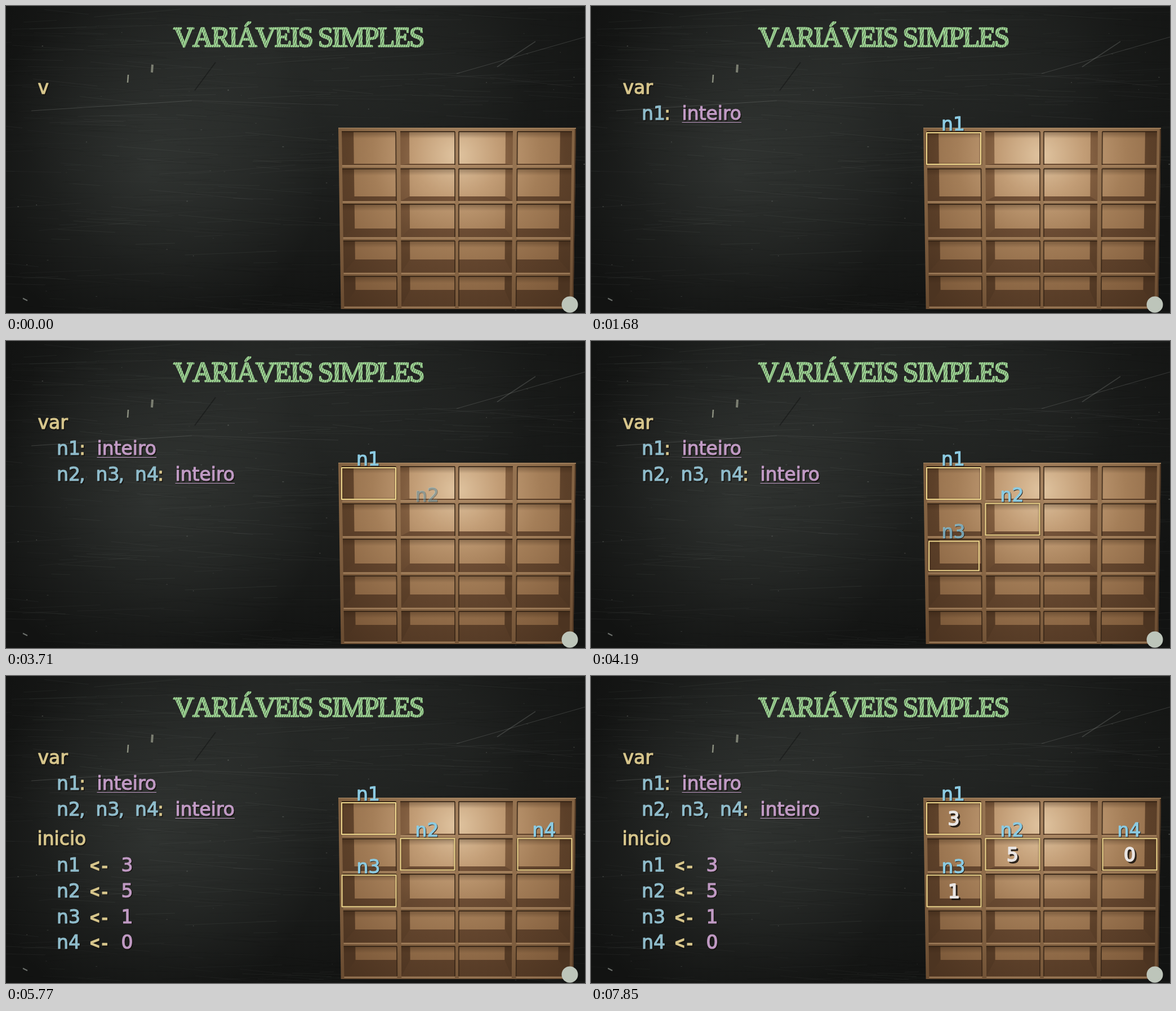
Recreate the animation shown at these times as an HTML page with a canvas. Size 1028 by 545 pixels, loop 8260 ms.

```html
<!DOCTYPE html>
<html lang="pt">
<head>
<meta charset="utf-8">
<title>Variáveis simples</title>
<style>
html, body { margin: 0; width: 100%; height: 100%; overflow: hidden; background: #111; }
canvas { display: block; width: 100vw; height: 100vh; }
</style>
</head>
<body>
<canvas id="stage" width="1028" height="545"></canvas>
<script>
const W = 1028, H = 545, LOOP = 8260, STEP = 70;
const BLUE = '#8fbccb', YELLOW = '#d7c68c', PINK = '#c09ac4', GREEN = '#a0d896';
const HAND = '33px "DejaVu Sans", sans-serif';
const MONO = 'bold 29px "Liberation Mono", monospace';

const clamp = v => Math.max(0, Math.min(1, v));
const easeOut = v => 1 - (1 - clamp(v)) ** 3;

function layer() {
  const canvas = document.createElement('canvas');
  canvas.width = W;
  canvas.height = H;
  return canvas.getContext('2d');
}

function seeded(seed) {
  return () => (seed = seed * 16807 % 2147483647) / 2147483647;
}

function line(c, x1, y1, x2, y2, color, width = 1) {
  c.strokeStyle = color;
  c.lineWidth = width;
  c.beginPath();
  c.moveTo(x1, y1);
  c.lineTo(x2, y2);
  c.stroke();
}

function polygon(c, points, fill) {
  c.fillStyle = fill;
  c.beginPath();
  points.forEach(([x, y]) => c.lineTo(x, y));
  c.fill();
}

function radial(c, x, y, r, ...colors) {
  const g = c.createRadialGradient(x, y, 0, x, y, r);
  colors.forEach((color, i) => g.addColorStop(i / (colors.length - 1), color));
  return g;
}

function drawBoard(c) {
  const random = seeded(77);
  const glow = (x, y, r, alpha) => {
    c.fillStyle = radial(c, x, y, r, `rgba(84,90,86,${alpha})`, `rgba(84,90,86,${alpha * .55})`, 'rgba(84,90,86,0)');
    c.fillRect(0, 0, W, H);
  };
  c.fillStyle = '#121312';
  c.fillRect(0, 0, W, H);
  glow(255, 285, 310, .36);
  glow(470, 80, 470, .32);
  glow(820, 130, 320, .14);

  for (let i = 0; i < 700; i++) {
    const x = random() * W - 60, y = random() * H, length = 20 + random() * 170;
    const slope = (random() - .45) * .2, tone = random() < .5 ? '0,0,0' : '185,195,188';
    line(c, x, y, x + length, y + length * slope, `rgba(${tone},${.015 + random() * .06})`);
  }
  for (let i = 0; i < 70; i++) {
    c.fillStyle = `rgba(200,205,198,${random() * .25})`;
    c.fillRect(random() * W, random() * H, 1 + random() * 2, 1 + random());
  }
  const chalk = 'rgba(190,196,190,.2)';
  line(c, 45, 186, 330, 168, chalk);
  line(c, 330, 168, 590, 176, 'rgba(190,196,190,.1)');
  line(c, 800, 120, 1028, 55, chalk);
  line(c, 872, 108, 940, 63, chalk, 1.5);
  line(c, 335, 150, 372, 100, 'rgba(0,0,0,.3)', 2);
  line(c, 217, 122, 216, 136, 'rgba(205,210,185,.6)', 2.5);
  line(c, 260, 104, 259, 118, 'rgba(205,210,185,.5)', 4);
  line(c, 30, 519, 38, 523, 'rgba(200,205,200,.5)', 2);
}

function drawShelf(c) {
  const sx = (x, y) => 800 + (x - 800) * (1 - .022 * (y - 216) / 322);
  const shape = (points, fill) => polygon(c, points.map(([x, y]) => [sx(x, y), y]), fill);
  const quad = (l, t, r, b, fill) => shape([[l, t], [r, t], [r, b], [l, b]], fill);
  const columns = [[596, 692, 21, 0], [700, 797, 16, 0], [804, 900, 0, 13], [908, 1005, 0, 21]];
  const rows = [[223, 282, 2], [289, 346, 8], [352, 410, 15], [417, 473, 23], [480, 533, 29]];

  const frame = radial(c, 800, 260, 330, '#a5825f', '#8c6a48', '#6b4d32');
  const back = radial(c, 800, 265, 300, '#e0c4a0', '#c29d76', '#a47e58', '#906b48', '#7d5a3a');
  const wall = radial(c, 800, 270, 290, '#b08c68', '#7f5c3e', '#5c4029', '#4c3421');
  const floor = radial(c, 800, 330, 290, '#76543a', '#60432c', '#4a321f');

  quad(590, 216, 1012, 538, frame);
  line(c, 590, 216.5, 1012, 217.5, '#a88a66');
  line(c, sx(1011, 218), 218, sx(1011, 538), 538, '#4c3522', 2);

  for (const [top, bottom, depth] of rows) {
    for (const [l, r, wallL, wallR] of columns) {
      const base = bottom - depth, innerL = l + wallL, innerR = r - wallR;
      quad(l, top, r, bottom, wall);
      quad(innerL, top, innerR, base, back);
      shape([[innerL, base], [innerR, base], [r, bottom], [l, bottom]], floor);
      const shade = c.createLinearGradient(0, top, 0, top + 12);
      shade.addColorStop(0, 'rgba(45,28,14,.35)');
      shade.addColorStop(1, 'rgba(45,28,14,0)');
      quad(l, top, r, top + 12, shade);
      line(c, sx(l, top), top, sx(r, top), top, 'rgba(45,30,18,.8)', 2);
      const edge = wallL ? r : l;
      line(c, sx(edge, top), top, sx(edge, bottom), bottom, 'rgba(50,33,20,.75)', 2);
      line(c, sx(l, bottom), bottom + 2, sx(r, bottom), bottom + 2, 'rgba(196,160,122,.5)', 2);
    }
  }
}

// Sketched lettering: each letter wobbles, is hatched and gets a loose outline.
function drawTitle(target) {
  const c = layer(), random = seeded(5);
  const eachLetter = draw => {
    let x = 299;
    for (const letter of 'VARIÁVEIS SIMPLES') {
      const advance = c.measureText(letter).width - 2.6;
      c.save();
      c.translate(x + advance / 2, 71.5);
      draw(letter);
      c.restore();
      x += advance;
    }
  };
  c.font = '50px "Liberation Serif", serif';
  c.textAlign = 'center';
  c.lineJoin = 'round';
  c.fillStyle = c.strokeStyle = GREEN;
  c.lineWidth = 2.4;
  eachLetter(letter => {
    c.fillText(letter, 0, 0);
    c.strokeText(letter, 0, 0);
  });
  c.globalCompositeOperation = 'destination-out';
  for (let x = 270; x < 750; x += 4) line(c, x, 80, x + 20, 24, 'rgba(0,0,0,.65)', 1.2);
  c.globalCompositeOperation = 'source-over';
  c.strokeStyle = GREEN;
  c.lineWidth = .8;
  eachLetter(letter => {
    c.rotate((random() - .5) * .09);
    c.strokeText(letter, 0, (random() - .5) * 2);
  });
  target.drawImage(c.canvas, 0, 0);
}

function drawScene() {
  const c = layer();
  drawBoard(c);
  drawShelf(c);
  drawTitle(c);
  c.fillStyle = '#bdc5ba';
  c.beginPath();
  c.arc(1001, 530, 14.5, 0, Math.PI * 2);
  c.fill();
  return c.canvas;
}

// Code tokens: text, x, baseline, colour.
const assignment = (name, value, y) =>
  [[name, 90, y, BLUE], ['<-', 149, y, YELLOW], [value, 204.5, y, PINK]];

const blocks = [
  { start: 130, rate: 1, initial: 1, tokens: [['var', 56.5, 156, YELLOW]] },
  { start: 540, rate: 1.5, tokens: [['n1', 90, 202, BLUE], [':', 130, 202, YELLOW], ['inteiro', 161.5, 202, PINK]] },
  { start: 2810, rate: 2.1, tokens: [
    ['n2', 90, 248, BLUE], [',', 130, 248, BLUE], ['n3', 159.5, 248, BLUE], [',', 199.5, 248, BLUE],
    ['n4', 229, 248, BLUE], [':', 269, 248, YELLOW], ['inteiro', 300.5, 248, PINK]] },
  { start: 5150, rate: 2.9, tokens: [
    ['inicio', 55.5, 300, YELLOW],
    ...assignment('n1', '3', 346.5), ...assignment('n2', '5', 392.5),
    ...assignment('n3', '1', 438.5), ...assignment('n4', '0', 484)] }
];

const boxes = [
  { name: 'n1', value: '3', x: 644, y: 253, start: 1310, filled: 6180 },
  { name: 'n2', value: '5', x: 748.5, y: 316.5, start: 3600, filled: 6600 },
  { name: 'n3', value: '1', x: 644.5, y: 381.5, start: 3960, filled: 7010 },
  { name: 'n4', value: '0', x: 956.5, y: 316.5, start: 4330, filled: 7430 }
];

const ctx = document.getElementById('stage').getContext('2d');
const scene = drawScene();

function write(text, x, y, color, { align = 'left', weight = 1.2, shadow = 1.5, font = HAND } = {}) {
  ctx.font = font;
  ctx.textAlign = align;
  ctx.lineJoin = 'round';
  ctx.lineWidth = weight;
  const paint = (offset, style) => {
    ctx.fillStyle = ctx.strokeStyle = style;
    ctx.fillText(text, x + offset, y + offset);
    ctx.strokeText(text, x + offset, y + offset);
  };
  paint(shadow, 'rgba(20,16,14,.75)');
  paint(0, color);
}

function drawBlock({ start, rate, initial = 0, tokens }, t) {
  const steps = t < start ? 0 : Math.floor((t - start) / STEP) + 1;
  let left = Math.floor(initial + steps * rate);
  for (const [text, x, y, color] of tokens) {
    if (left <= 0) return;
    const shown = text.slice(0, left);
    write(shown, x, y, color, { font: text === '<-' ? MONO : HAND });
    if (text === 'inteiro') {
      line(ctx, x, y + 4.5, x + ctx.measureText(shown).width, y + 4.5, PINK);
    }
    left -= text.length;
  }
}

function drawBox({ name, value, x, y, start, filled }, t) {
  const p = clamp((t - start) / 460);
  const scale = easeOut((p - .3) / .35);
  if (scale > 0) {
    const w = 96 * scale, h = 56 * scale;
    ctx.lineWidth = 2;
    ctx.strokeStyle = '#f0d88e';
    ctx.shadowColor = 'rgba(40,25,10,.6)';
    ctx.shadowBlur = 3;
    ctx.strokeRect(x - w / 2, y - h / 2, w, h);
    ctx.shadowBlur = 0;
    ctx.shadowColor = 'transparent';
  }
  ctx.globalAlpha = clamp(p * 1.4);
  write(name, x - 1, y - 32, '#8ccbe2', { align: 'center', shadow: 1 });

  const rise = clamp((t - filled) / 410);
  ctx.globalAlpha = rise;
  write(value, x, y + 12 + 16 * (1 - easeOut(rise)), '#e9e5e3', { align: 'center', weight: 2, shadow: 3 });
  ctx.globalAlpha = 1;
}

function render(now) {
  const t = now % LOOP;
  ctx.drawImage(scene, 0, 0);
  blocks.forEach(block => drawBlock(block, t));
  boxes.forEach(box => drawBox(box, t));
}

const begin = performance.now();
function tick() {
  render(performance.now() - begin);
  requestAnimationFrame(tick);
}
tick();
</script>
</body>
</html>
```
